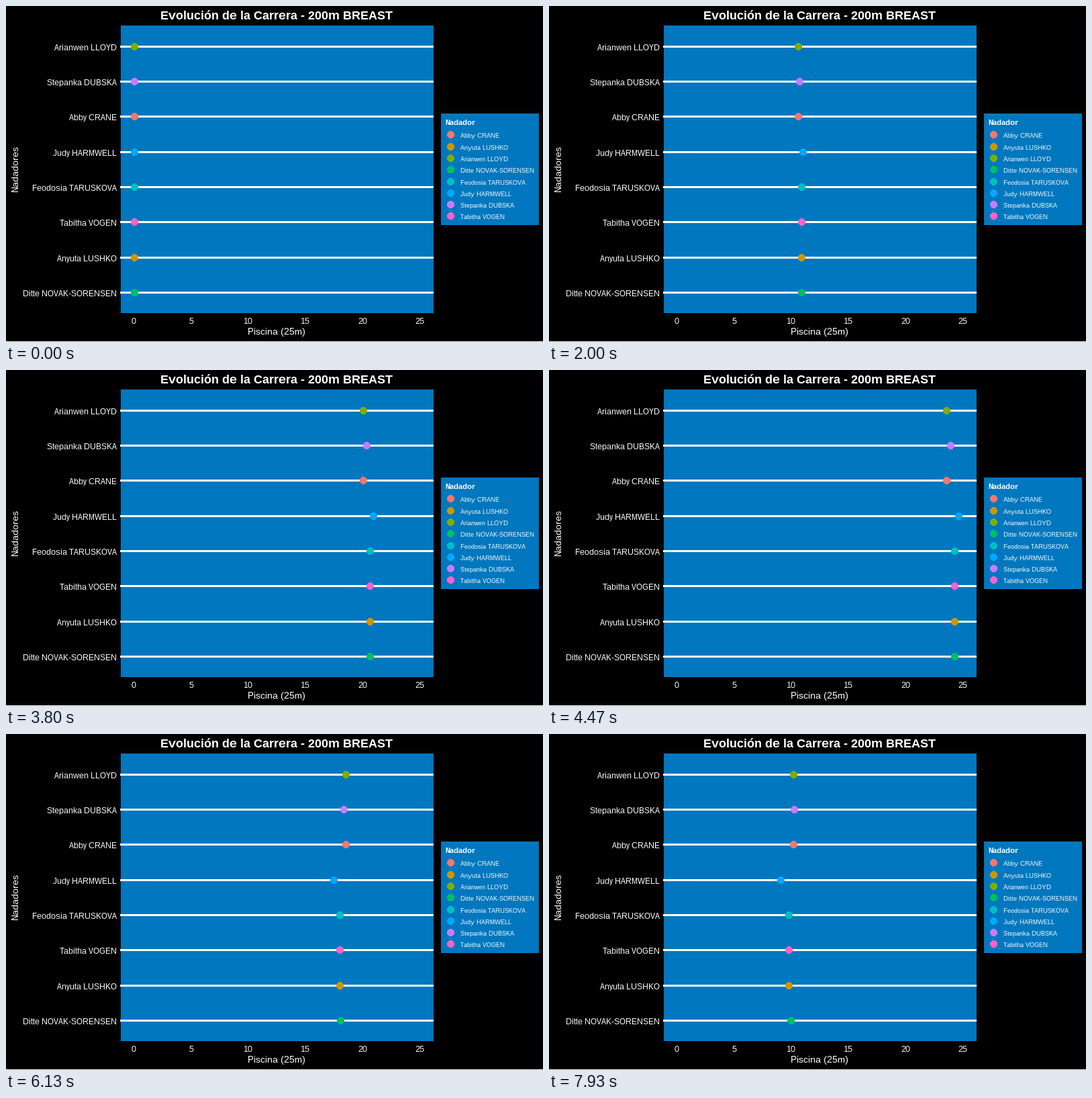
Animation, 800 px wide and 500 px high, one loop 8 s. Source, as a matplotlib script:

```python
import matplotlib.pyplot as plt
import numpy as np
from matplotlib.animation import FuncAnimation
from matplotlib.patches import Circle, Rectangle

W, H, DPI = 800, 500, 100
LOOP_MS, TICK_MS = 8000, 25
POOL = "#0077BE"
START, WALL = 190.95, 615.95   # pixel positions of 0 m and 25 m

# name, colour, lane from the top, steps for the first and second length
SWIMMERS = [
    ("Abby CRANE", "#F8766D", 2, 71, 81),
    ("Anyuta LUSHKO", "#CD9600", 6, 69, 82),
    ("Arianwen LLOYD", "#7CAE00", 0, 71, 81),
    ("Ditte NOVAK-SORENSEN", "#00BE67", 7, 69, 83),
    ("Feodosia TARUSKOVA", "#00BFC4", 4, 69, 82),
    ("Judy HARMWELL", "#00A9FF", 3, 68, 80),
    ("Stepanka DUBSKA", "#C77CFF", 1, 70, 83),
    ("Tabitha VOGEN", "#FF61CC", 5, 69, 82),
]

# fully hinted glyphs with whole-pixel advances
plt.rcParams.update({
    "font.family": "Liberation Sans",
    "text.hinting": "default",
    "text.hinting_factor": 1,
})
fig = plt.figure(figsize=(W / DPI, H / DPI), dpi=DPI, facecolor="black")
ax = fig.add_axes([0, 0, 1, 1])
ax.set_xlim(0, W)
ax.set_ylim(H, 0)
ax.axis("off")


def box(x0, y0, x1, y1, color):
    ax.add_patch(Rectangle((x0, y0), x1 - x0, y1 - y0, fc=color, lw=0,
                           antialiased=False))


def dot(x, y, color):
    # without antialiasing every touched pixel fills: 11 px across
    return ax.add_patch(Circle((x + 0.5, y + 0.5), 4.9, fc=color, lw=0,
                               antialiased=False, zorder=3))


def label(x, y, text, px, ha="center", **kw):
    ax.text(x, y, text, color="white", fontsize=px * 72 / DPI, ha=ha,
            va="baseline", **kw)


def lane_y(lane):
    return round(59.9 + 52.29 * lane)


def swim_x(step, out, back):
    return round(float(np.interp(step, [0, out, out + back],
                                 [START, WALL, START])))


# pool and axes
box(171, 29, 637, 457, POOL)
box(0, 499, W, H, "white")
label(403.5, 20, "Evolución de la Carrera - 200m BREAST", 18, weight="bold")
label(403.5, 489, "Piscina (25m)", 14)
label(18, 242, "Nadadores", 14, rotation=90, rotation_mode="anchor")
for metres in range(0, 26, 5):
    label(190.5 + 17.02 * metres, 473, str(metres), 12)

# legend
box(648, 160, 794, 326, POOL)
label(654, 177, "Nadador", 11, ha="left", weight="bold")

dots = []
for i, (name, color, lane, _, _) in enumerate(SWIMMERS):
    y = lane_y(lane)
    box(170, y - 1, 637, y + 2, "white")
    label(165, y + 6, name, 12, ha="right")
    dots.append(dot(round(START), y, color))

    key_y = round(191.4 + 17.28 * i)
    dot(662, key_y, color)
    label(677, key_y + 5, name, 9, ha="left")


def update(tick):
    # 15 steps a second: three steps in every eight ticks
    step = (3 * tick + 2) // 8
    for d, (_, _, lane, out, back) in zip(dots, SWIMMERS):
        d.center = swim_x(step, out, back) + 0.5, lane_y(lane) + 0.5
    return dots


anim = FuncAnimation(fig, update, frames=LOOP_MS // TICK_MS,
                     interval=TICK_MS, repeat=True, repeat_delay=0)
plt.show()
```
